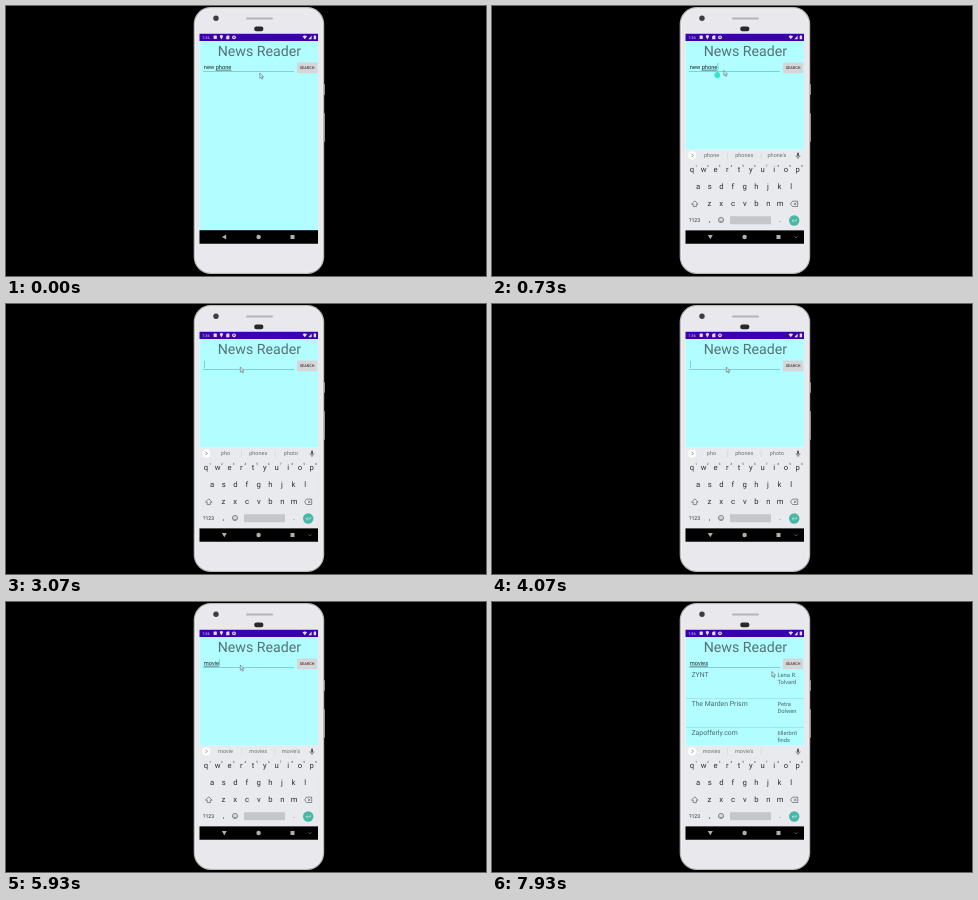
Recreate the animation shown at these times as an HTML page. Size 480 by 270 pixels, loop 8 s.

```html
<!DOCTYPE html>
<html lang="en">
<head>
<meta charset="utf-8">
<title>News Reader</title>
<style>
  html, body { margin: 0; width: 100%; height: 100%; overflow: hidden; background: #000; }
  svg { display: block; width: 100vw; height: 100vh; }
  text { font-family: Roboto, "Noto Sans", sans-serif; white-space: pre; text-rendering: geometricPrecision; }
  .mid { text-anchor: middle; }
  .word { text-decoration: underline; text-decoration-thickness: .5px; }
  .line { fill: none; stroke: #555; stroke-width: .65; }
</style>
</head>
<body>
<svg viewBox="0 0 480 270">
  <defs>
    <clipPath id="screen"><rect x="193.5" y="27.7" width="118.5" height="210.1"/></clipPath>
    <clipPath id="content"><rect x="193.5" y="35" width="118.5" height="109"/></clipPath>
  </defs>
  <rect width="480" height="270"/>

  <!-- phone body -->
  <g fill="#c4c4c6">
    <rect x="316" y="78" width="2.7" height="11" rx=".8"/>
    <rect x="316" y="107" width="2.7" height="29" rx=".8"/>
  </g>
  <rect x="187.7" y="1" width="130.5" height="267" rx="17" fill="#b9b9ba"/>
  <rect x="189" y="2.3" width="127.9" height="264.4" rx="15.7" fill="#f1f1f4"/>
  <rect x="190" y="3.3" width="125.9" height="262.4" rx="14.7" fill="#e9e9ed"/>
  <circle cx="210" cy="12.3" r="2.7" fill="#3c3c42"/>
  <rect x="240" y="11.4" width="27" height="2" rx="1" fill="#b4b4b7"/>
  <rect x="248.2" y="20.5" width="9.2" height="4.8" rx="2.2" fill="#29292d"/>

  <g clip-path="url(#screen)">
    <rect x="193" y="27" width="120" height="198" fill="#fff"/>
    <rect id="page" x="193" y="35" width="120" height="189" fill="#b1fdff"/>

    <!-- status bar -->
    <rect x="193" y="27" width="120" height="8" fill="#3900ad"/>
    <g fill="#e4dcf6">
      <text x="196.2" y="32.8" font-size="3.9">1:36</text>
      <rect x="207.6" y="29.6" width="3.2" height="3.4" rx=".6"/>
      <path d="M215.4 33.4l-1.4-2.4a1.5 1.5 0 1 1 2.8 0z"/>
      <path d="M220.2 30.3l1.1-.9h2.1v3.8h-3.2z"/>
      <circle cx="228" cy="31.3" r="1.9"/>
      <path d="M296.5 30.3q2.3-1.8 4.6 0l-2.3 3zM302.4 33.2l3.2-3.6v3.6zM307.7 29.7h.7v-.5h1v.5h.7v3.6h-2.4z"/>
    </g>
    <circle cx="228" cy="31.3" r=".8" fill="#3900ad"/>

    <!-- page -->
    <text x="211.7" y="50" font-size="14.2" fill="#557274">News Reader</text>
    <rect id="fieldLine" x="197" width="91"/>
    <text id="field" x="197.8" y="62.8" font-size="5.7" fill="#1d2a2a"><tspan id="head"></tspan><tspan id="tail" class="word"></tspan></text>
    <rect id="caret" y="57" width=".7" height="7" fill="#3fcfc6"/>
    <path id="handle" d="M0 0l2.1 2.1a2.9 2.9 0 1 1-4.2 0z" fill="#36e3d0"/>
    <rect id="button" x="291" y="56.4" width="20.2" height="10.8" rx="1"/>
    <text class="mid" x="301.1" y="63.2" font-size="3.8" font-weight="500" fill="#3a3a3a">SEARCH</text>
    <g id="results" clip-path="url(#content)" fill="#4a6a6b"></g>

    <!-- navigation and keyboard -->
    <rect x="193" y="224.2" width="120" height="14"/>
    <g id="keyboard">
      <rect x="193" y="143.8" width="120" height="80.4" fill="#e8eaed"/>
      <circle cx="200.2" cy="149.4" r="4.1" fill="#fff"/>
      <path class="line" d="M199.5 147.7l1.7 1.7-1.7 1.7"/>
      <path d="M235.5 146.5v6.5M269.2 146.5v6.5" stroke="#d0d2d5" stroke-width=".6"/>
      <g id="hints" font-size="5.5" fill="#6b6e73"></g>
      <rect x="305.1" y="146.6" width="1.9" height="3.9" rx=".95" fill="#555"/>
      <path class="line" d="M304 149.3a2.05 2.05 0 0 0 4.1 0M306 151.4v1.6" stroke-width=".5"/>
      <g id="keys" fill="#2d2f33"></g>
      <path class="line" d="M202.8 194.8l3.3 3.4h-1.7v2.4h-3.2v-2.4h-1.7z"/>
      <path class="line" d="M298.5 197.8l2-2.7h5.2v5.4h-5.2zM302 196.6l2.3 2.4m0-2.4l-2.3 2.4"/>
      <circle class="line" cx="229" cy="214" r="2.6"/>
      <path class="line" d="M227.5 214.7q1.5 1.8 3 0M227.7 213h.7m1.2 0h.7" stroke-width=".5"/>
      <rect x="238" y="210.2" width="41" height="8" rx=".8" fill="#c4c6ca"/>
      <circle cx="302.2" cy="214.5" r="5.2" fill="#48b8a6"/>
      <path d="M304.4 213v1.8h-4.2m1.4-1.4l-1.4 1.4 1.4 1.4" fill="none" stroke="#d8f0ec" stroke-width=".6"/>
    </g>
    <g fill="#b0b0b0">
      <path id="back" d="M216 231l4.2-2.5v5z"/>
      <circle cx="252.6" cy="231" r="2.2"/>
      <rect x="284.5" y="229" width="4" height="4"/>
      <path id="chevron" d="M302.4 230.3l1.6 1.5 1.6-1.5" fill="none" stroke="#888" stroke-width=".6"/>
    </g>
  </g>
  <path id="mouse" d="M0 0v5.2l1.2-1 .9 1.9.9-.4-.9-1.9h1.7z" fill="#d5eef0" stroke="#566" stroke-width=".55"/>
</svg>
<script>
const LOOP = 8000, FOCUS = 520, SHOW_KEYS = 430, BLINK = 500;
const $ = id => document.getElementById(id);
const clamp = v => Math.max(0, Math.min(1, v));
const show = (id, on) => $(id).setAttribute("visibility", on ? "visible" : "hidden");
const set = (id, attrs) => { for (const k in attrs) $(id).setAttribute(k, attrs[k]); };
const label = (s, x, y, size, cls = "") =>
  `<text class="${cls}" x="${x}" y="${y}" font-size="${size}">${s}</text>`;

const edits = [
  [0, "new phone"], [FOCUS, "new phone"], [1330, "new phon"], [1470, "new pho"],
  [1870, "new p"], [1930, "new"], [1980, "n"], [2030, ""],
  [5330, "m"], [5440, "mo"], [5530, "mov"], [5670, "movi"], [5930, "movie"], [6130, "movies"]
];
const hints = [
  [0, "phone phones phone's"], [1870, "pho phones photo"], [5530, "mov move movie"],
  [5930, "movie movies movie's"], [6130, "movies movie's"]
];
const mousePath = [
  [0, 253.8, 67], [70, 253.8, 67], [400, 231.8, 64.3], [1000, 231.8, 64.3], [1070, 234.3, 63],
  [6420, 234.3, 63], [7130, 301.9, 62.4], [7540, 301.9, 62.4], [7930, 279.8, 69.5]
];
const articles = [
  ["ZYNT", "Lena R.", "Tolvard"],
  ["The Marden Prism", "Petra", "Dolwen"],
  ["Zapofferly.com", "tillerbrit", "finds"]
];

const keyRow = (letters, x, y, step) =>
  [...letters].map((c, i) => label(c, x + i * step, y, 7.7, "mid")).join("");

$("keys").innerHTML =
  keyRow("qwertyuiop", 200, 166.3, 11.75) +
  [..."1234567890"].map((c, i) => label(c, 204 + i * 11.75, 161.2, 3, "mid")).join("") +
  keyRow("asdfghjkl", 206, 183.4, 11.65) +
  keyRow("zxcvbnm", 217.5, 200.3, 11.75) +
  label("?123", 202.6, 216.2, 5.2, "mid") + label(",", 217.5, 216, 7, "mid") + label(".", 288, 216, 7, "mid");

$("results").innerHTML = articles.map(([name, first, last], i) => {
  const y = 75 + 29 * i;
  return label(name, 199.4, y, 6.9) + label(first, 285.4, y, 5.8) + label(last, 285.4, y + 6.5, 5.8) +
    `<rect x="193" y="${y + 21.3}" width="120" height=".5" fill="#8fd0d2"/>`;
}).join("");

const latest = (list, t) => list.filter(e => e[0] <= t).pop();

function mouseAt(t) {
  const i = mousePath.findIndex(p => p[0] > t);
  if (i < 0) return mousePath[mousePath.length - 1].slice(1);
  const [t0, x0, y0] = mousePath[i - 1], [t1, x1, y1] = mousePath[i];
  const u = (t - t0) / (t1 - t0), k = u * u * (3 - 2 * u);
  return [x0 + (x1 - x0) * k, y0 + (y1 - y0) * k];
}

let shownHints;
function draw(t) {
  const [editTime, text] = latest(edits, t);
  const cut = text.lastIndexOf(" ") + 1;
  $("head").textContent = text.slice(0, cut);
  $("tail").textContent = text.slice(cut);
  const caretX = 198 + (text ? $("field").getComputedTextLength() : 0);
  const focused = t >= FOCUS;
  set("caret", { x: caretX });
  show("caret", focused && Math.floor((t - editTime) / BLINK) % 2 === 0);
  set("handle", { transform: `translate(${caretX - .3} 65.2)` });
  show("handle", focused && t < 1330);
  set("fieldLine", focused
    ? { y: 65.1, height: .9, fill: "#52dfd6" }
    : { y: 65.4, height: .5, fill: "#6f999b" });

  const words = latest(hints, t)[1];
  if (words !== shownHints) {
    $("hints").innerHTML = words.split(" ").map((w, i) => label(w, 219.5 + 32.7 * i, 151.2, 5.5, "mid")).join("");
    shownHints = words;
  }

  const open = t >= SHOW_KEYS;
  const rise = 46 * (1 - clamp((t - SHOW_KEYS) / 300)) ** 2;
  set("page", { height: open ? 108.7 : 189.2 });
  set("keyboard", { transform: `translate(0 ${rise})`, opacity: clamp((t - SHOW_KEYS) / 200) });
  set("back", { transform: t > 600 ? "rotate(-90 218.3 231)" : "" });
  show("chevron", t > 600);

  set("button", { fill: t >= 7200 && t < 7400 ? "#bcbcbf" : "#d7d5d8" });
  show("results", t >= 7400);
  set("mouse", { transform: `translate(${mouseAt(t).join(" ")})` });
}

const start = performance.now();
function tick() {
  draw((performance.now() - start) % LOOP);
  requestAnimationFrame(tick);
}
tick();
</script>
</body>
</html>
```
